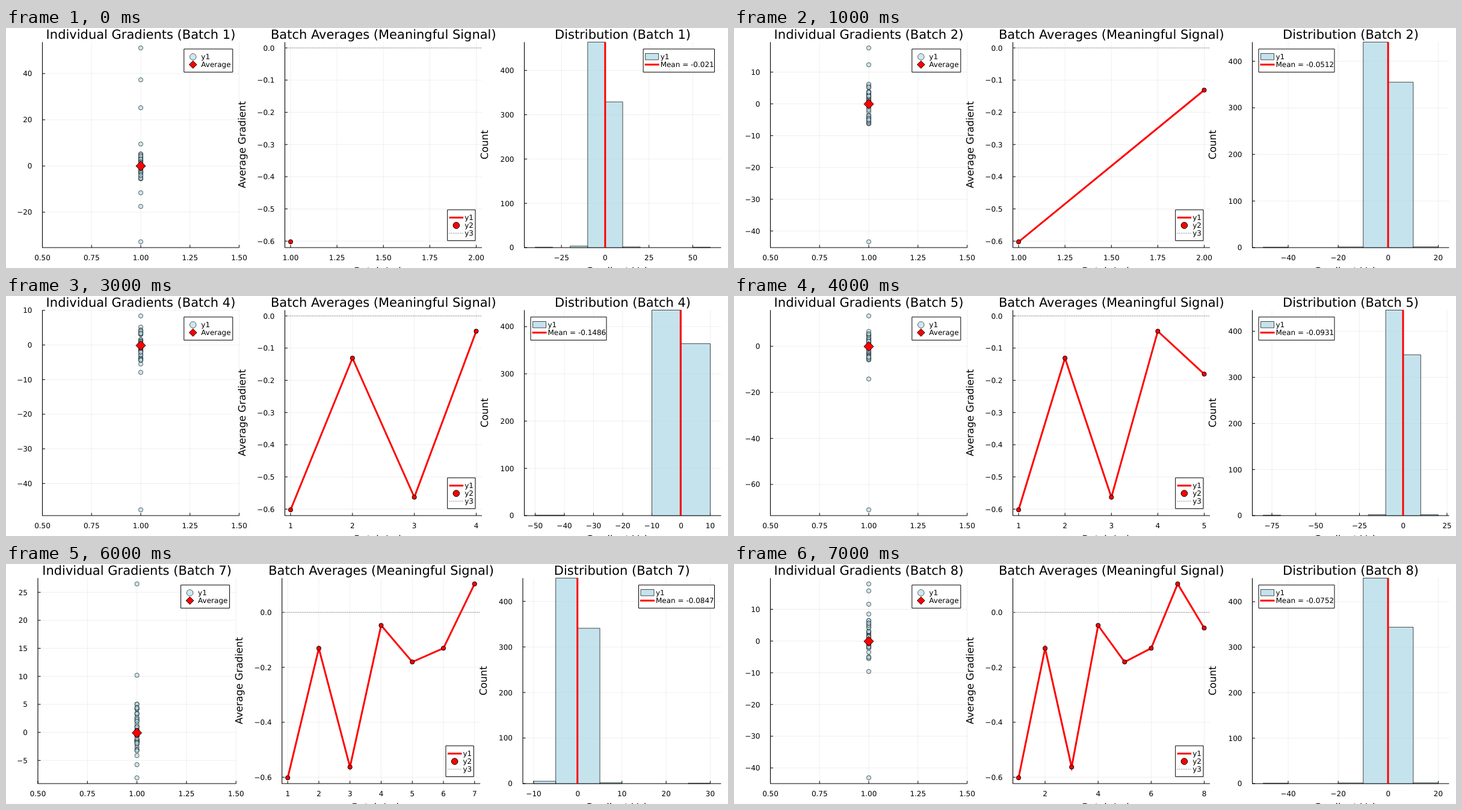
An HTML page with a canvas that plays this animation: 1200 px wide and 400 px high, repeating every 8 s.

```html
<!DOCTYPE html>
<html lang="en">
<head>
<meta charset="utf-8">
<title>Gradient batches</title>
<style>
  html, body { margin: 0; width: 100%; height: 100%; overflow: hidden; background: #fff; }
  canvas { display: block; }
</style>
</head>
<body>
<canvas width="1200" height="400"></canvas>
<script>
const ctx = document.querySelector('canvas').getContext('2d');
const TOP = 23.5, BOTTOM = 366, DATA_TOP = 33.2, DATA_BOTTOM = 356.3;
const SAMPLES = 800;

// Panel edges [left, right]; the narrow layout is used when the y labels are short.
const WIDE = [[60.5, 387.5], [463.5, 791], [861.5, 1188.5]];
const NARROW = [[53, 382.3], [458.7, 788.3], [859, 1188.5]];

// lo, hi: data range; far: lone points; below, above: counts in the bins beside zero
const BATCHES = [
  { avg: -0.602, mean: -0.021, lo: -32.8, hi: 51.1, below: 464, above: 329, far: [37.3, 25.2, 9.5, -11.6, -17.5] },
  { avg: -0.131, mean: -0.0512, lo: -43.4, hi: 17.6, below: 441, above: 355, far: [12.3] },
  { avg: -0.563, mean: -0.003, lo: -8, hi: 26.5, below: 416, above: 372, far: [18.3, 16, 7.2] },
  { avg: -0.0475, mean: -0.1486, lo: -47.6, hi: 8.4, below: 435, above: 364, far: [-7.9] },
  { avg: -0.1805, mean: -0.0931, lo: -71, hi: 13.2, below: 446, above: 349, far: [-14.2] },
  { avg: -0.1305, mean: 0.1107, lo: -62, hi: 269.8, below: 459, above: 339, far: [19, 8, -9.3] },
  { avg: 0.1035, mean: -0.0847, lo: -8.1, hi: 26.5, below: 451, above: 341, far: [10.2] },
  { avg: -0.057, mean: -0.0752, lo: -43.1, hi: 18, below: 452, above: 344, far: [15.8, 11.6, 8.5, -9.6] },
];

const scale = (a, b, pa, pb) => v => pa + (v - a) / (b - a) * (pb - pa);

// Round step closest to the given one
function nice(step) {
  const power = 10 ** Math.floor(Math.log10(step));
  return [1, 2, 2.5, 5, 10].map(k => k * power)
    .reduce((a, b) => Math.abs(b - step) < Math.abs(a - step) ? b : a);
}

function random(seed) {
  return () => (seed = (seed * 16807) % 2147483647) / 2147483647;
}

function line(points, color = '#000', width = 1, dash = []) {
  ctx.beginPath();
  points.forEach(p => ctx.lineTo(...p));
  ctx.strokeStyle = color;
  ctx.lineWidth = width;
  ctx.setLineDash(dash);
  ctx.stroke();
  ctx.setLineDash([]);
}

function setFont(size) {
  ctx.font = `${size}px "DejaVu Sans", sans-serif`;
  ctx.textRendering = 'geometricPrecision';
}

function text(str, x, y, size = 12, align = 'left', angle = 0) {
  ctx.save();
  ctx.translate(x, y);
  ctx.rotate(angle);
  setFont(size);
  ctx.textAlign = align;
  ctx.fillStyle = '#000';
  ctx.fillText(str, 0, 0);
  ctx.restore();
}

function paint(fill, stroke) {
  ctx.fillStyle = fill;
  ctx.strokeStyle = stroke;
  ctx.lineWidth = 1;
  ctx.fill();
  ctx.stroke();
}

function circle(x, y, r, fill, stroke = '#000') {
  ctx.beginPath();
  ctx.arc(x, y, r, 0, 7);
  paint(fill, stroke);
}

function diamond(x, y, r) {
  ctx.beginPath();
  [[0, -r], [r, 0], [0, r], [-r, 0]].forEach(([dx, dy]) => ctx.lineTo(x + dx, y + dy));
  ctx.closePath();
  paint('#f00', '#000');
}

function box(x, y, w, h, fill, stroke = '#000') {
  ctx.beginPath();
  ctx.rect(x, y, w, h);
  paint(fill, stroke);
}

const paleDot = (x, y, r) => circle(x, y, r, 'rgba(173,216,230,.6)', 'rgba(0,0,0,.6)');
const paleBar = (x, y, w, h) => box(x, y, w, h, 'rgba(173,216,230,.7)', 'rgba(0,0,0,.7)');
const zeroLine = (x1, x2, y) => line([[x1, y], [x2, y]], '#777', 1, [1.5, 1.5]);

function ticks(map, step, lo, hi) {
  const digits = [0, 1, 2].find(d => step * 10 ** d % 1 < 1e-9);
  const list = [];
  for (let i = -20; i <= 20; i++) {
    const pos = map(i * step);
    if (pos > lo - 0.5 && pos < hi + 0.5)
      list.push([pos, (i * step).toFixed(digits).replace('-', '\u2212')]);
  }
  return list;
}

function axes([l, r], X, Y, xStep, yStep, title) {
  const xs = ticks(X, xStep, l, r), ys = ticks(Y, yStep, TOP, BOTTOM);
  const grid = 'rgba(0,0,0,.065)';
  xs.forEach(([x]) => line([[x, TOP], [x, BOTTOM]], grid));
  ys.forEach(([y]) => line([[l, y], [r, y]], grid));
  line([[l, TOP], [l, BOTTOM], [r, BOTTOM]], '#000', 1.1);
  for (const [x, label] of xs) {
    line([[x, BOTTOM], [x, BOTTOM - 4.5]]);
    text(label, x, 387, 12, 'center');
  }
  for (const [y, label] of ys) {
    line([[l, y], [l + 4.5, y]]);
    text(label, l - 17, y + 4.4, 12, 'right');
  }
  text(title, (l + r) / 2, 18.3, 21, 'center');
}

function guides([l, r], xLabel, yLabel, offset) {
  text(yLabel, l - offset, 194.5, 16.5, 'center', -Math.PI / 2);
  text(xLabel, (l + r) / 2, 410.5, 16.5, 'center');
}

function legend(x, y, w, labels) {
  box(x, y, w, 12.8 * labels.length + 13, '#fff');
  labels.forEach((label, i) => text(label, x + 28.5, y + 17.3 + 13 * i));
}

function drawScatter(b, n, panel) {
  const [l, r] = panel, mid = (l + r) / 2;
  const Y = scale(b.hi, b.lo, DATA_TOP, DATA_BOTTOM);
  axes(panel, scale(0.5, 1.5, l, r), Y, 0.25, nice((b.hi - b.lo) / 4.65), `Individual Gradients (Batch ${n})`);
  const rnd = random(n * 7919 + 13);
  const cluster = Array.from({ length: 150 }, () => 6.5 * (2 * rnd() - 1) ** 7);
  [...cluster, ...b.far, b.lo, b.hi].forEach(v => paleDot(mid, Y(v), 3.6));
  diamond(mid, Y(b.mean), 8);

  const x = r - 91.7;
  legend(x, 35, 81, ['y1', 'Average']);
  paleDot(x + 15, 48, 5.3);
  diamond(x + 15, 61, 6.3);
}

function drawAverages(b, n, panel) {
  const [l, r] = panel;
  const shown = BATCHES.slice(0, n).map(batch => batch.avg);
  const span = Math.max(n - 1, 1), lo = Math.min(...shown), hi = Math.max(0, ...shown);
  const X = scale(1, 1 + span, l + 9.5, r - 9.5);
  const Y = scale(hi, lo, DATA_TOP, DATA_BOTTOM);
  const xStep = span < 3 ? span / 4 : Math.ceil(span / 6);
  axes(panel, X, Y, xStep, nice((hi - lo) / 4.65), 'Batch Averages (Meaningful Signal)');
  const points = shown.map((v, i) => [X(i + 1), Y(v)]);
  line(points, '#f00', 3);
  points.forEach(([x, y]) => circle(x, y, 3.6, '#f00'));
  zeroLine(l, r, Y(0));
  guides(panel, 'Batch Index', 'Average Gradient', 66);

  const x = r - 57.3, y = n === 3 ? 35 : 303;
  legend(x, y, 46.3, ['y1', 'y2', 'y3']);
  line([[x + 3, y + 13], [x + 26.5, y + 13]], '#f00', 3);
  circle(x + 14.7, y + 26, 5.3, '#f00');
  zeroLine(x + 3, x + 26.5, y + 39);
}

// One sample at each end, the rest of the tails next to the two central bins
function binCounts(b, first, last) {
  const rest = Math.max(0, SAMPLES - b.below - b.above - 2);
  const counts = { [-1]: b.below, 0: b.above, [-2]: 0.7 * rest, 1: 0.3 * rest };
  for (const end of [first, last])
    if (end < -1 || end > 0) counts[end] = (counts[end] || 0) + 1;
  return counts;
}

function drawHistogram(b, n, panel) {
  const [l, r] = panel;
  const bin = nice((b.hi - b.lo) / 7);
  const first = Math.floor(b.lo / bin), end = Math.ceil(b.hi / bin);
  const X = scale(first * bin, end * bin, l + 18, r - 18);
  const Y = scale(0, b.below, BOTTOM, TOP);
  axes(panel, X, Y, nice((end - first) * bin / 4.2), 100, `Distribution (Batch ${n})`);
  const counts = binCounts(b, first, end - 1);
  for (let i = first; i < end; i++)
    if (counts[i]) paleBar(X(i * bin), Y(counts[i]), X(bin) - X(0), BOTTOM - Y(counts[i]));
  line([[X(b.mean), TOP], [X(b.mean), BOTTOM]], '#f00', 3);
  guides(panel, 'Gradient Value', 'Count', 60.5);

  const label = `Mean = ${b.mean}`;
  setFont(12);
  const w = ctx.measureText(label).width + 29.3;
  const x = -b.lo > b.hi ? l + 10.5 : r - 11 - w;
  legend(x, 35, w, ['y1', label]);
  paleBar(x + 3.5, 42.5, 22, 10.5);
  line([[x + 2.5, 61], [x + 26.5, 61]], '#f00', 3);
}

let current = -1;
function tick() {
  const i = Math.floor(performance.now() / 1000) % BATCHES.length;
  if (i !== current) {
    current = i;
    const b = BATCHES[i], panels = b.lo > -10 ? NARROW : WIDE;
    ctx.fillStyle = '#fff';
    ctx.fillRect(0, 0, 1200, 400);
    [drawScatter, drawAverages, drawHistogram].forEach((draw, k) => draw(b, i + 1, panels[k]));
  }
  requestAnimationFrame(tick);
}
tick();
</script>
</body>
</html>
```
